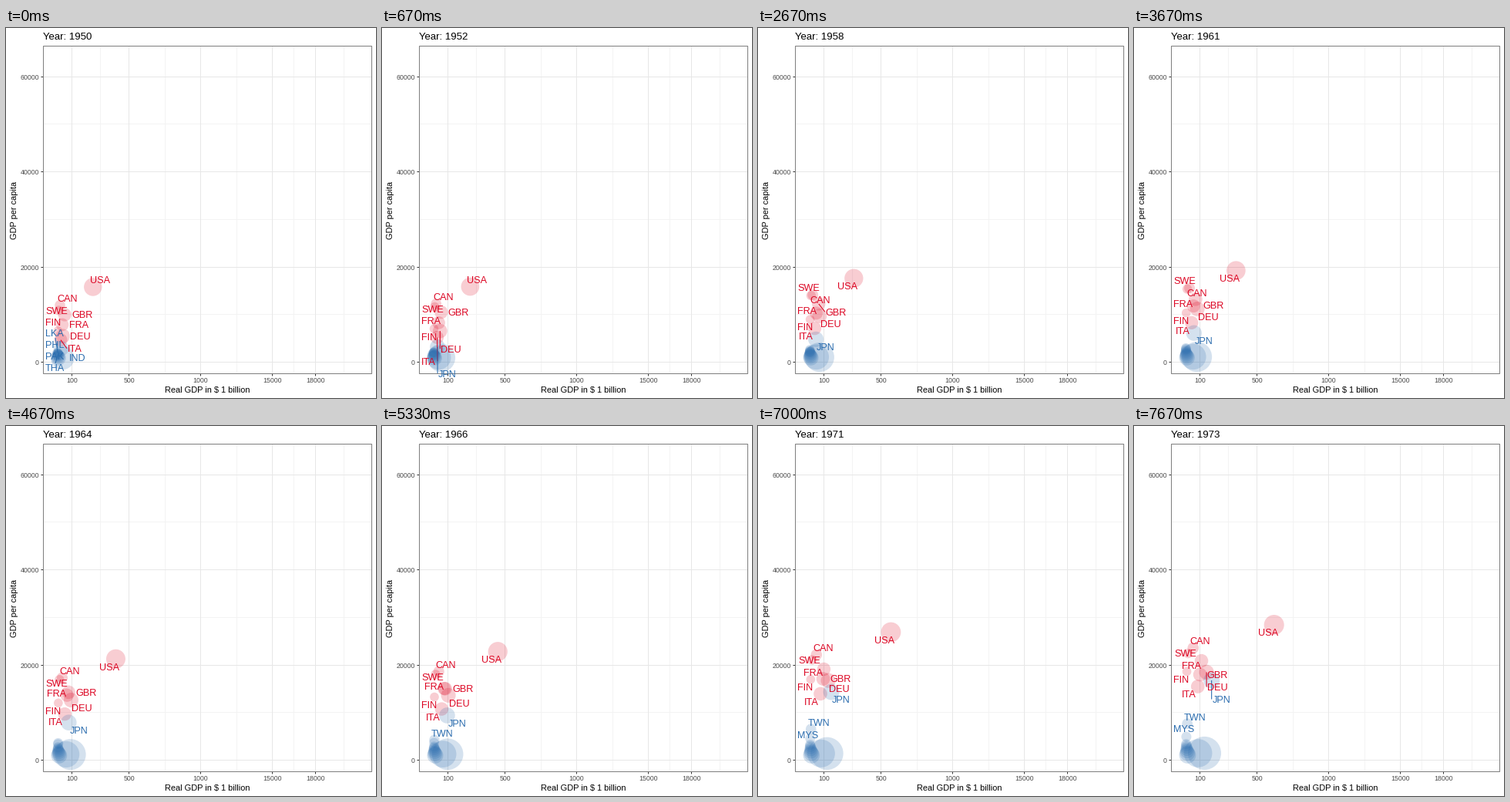
A matplotlib script for the animation above (8000 ms loop, 480x480 px).

```python
import matplotlib.pyplot as plt
import numpy as np
from matplotlib.animation import FuncAnimation
from matplotlib.patches import Circle, Rectangle

plt.rcParams["font.family"] = "Liberation Sans"

FIRST, LAST = 1950, 1973
LOOP, STEP = 8000, 50  # ms
RED, BLUE = "#DC0522", "#2A6CAE"
PT = 72 / 80  # points per pixel at 80 dpi
LEFT, RIGHT, TOP, BOTTOM = 48.5, 474.5, 23.5, 448.5

# Label offset from the bubble: left edge and middle height
SIDES = {"above": (-4, -9), "below": (1, 10), "right": (9, 0),
         "left": (-26, -3), "left up": (-18, -11), "left down": (-21, 10)}

# code: millions of people, thousands per head (first and last year),
# early deviation from steady growth, label side
RICH = {
    "CAN": ((14, 22.5), (12.0, 23.6), -0.07, "above"),
    "DEU": ((68, 79), (5.5, 18.5), 0.15, "below"),
    "FIN": ((4, 4.7), (6.6, 18.65), -0.05, "left down"),
    "FRA": ((42, 53), (7.9, 20.9), -0.07, "left"),
    "GBR": ((50, 56), (10.0, 18.0), 0, "right"),
    "ITA": ((47, 55), (4.7, 15.5), 0, "left down"),
    "SWE": ((7, 8.1), (10.9, 22.45), 0, "left up"),
    "USA": ((156, 217), (15.82, 28.44), -0.095, "left down"),
}
ASIA = {
    "CHN": ((546, 882), (0.9, 1.5), 0, "right"),
    "IND": ((359, 580), (0.95, 1.5), 0, "right"),
    "JPN": ((84, 108), (2.9, 16.8), -0.1, "below"),
    "MYS": ((6, 11), (1.9, 4.95), 0, "left up"),
    "TWN": ((8, 15.6), (1.3, 7.7), -0.1, "above"),
}
# The smaller Asian economies: the more people, the lower the income
SMALL = ("LKA", "KOR", "THA", "PHL", "PAK", "BGD", "IDN")
for code, people, start, end in zip(SMALL, np.geomspace(8, 77, 7),
                                    np.linspace(2.0, 0.9, 7),
                                    np.linspace(3.4, 1.1, 7)):
    ASIA[code] = ((people, people * 1.6), (start, end), 0, "left")
COUNTRIES = RICH | ASIA

CROWDED_UNTIL = 1951
CROWDED_SIDES = {"FRA": "right", "DEU": "right", "ITA": "right",
                 "FIN": "left up"}
LEFT_STACK = ("LKA", "PHL", "PAK", "THA")
LABELLED_FROM = {"JPN": 1952, "TWN": 1966, "MYS": 1971}


def x_px(gdp):
    return 66.9 + 0.186 * gdp


def y_px(per_capita):
    return 433.7 - 6.177 * per_capita


def grow(ends, t):
    return ends[0] * (ends[1] / ends[0]) ** t


def bubble(code, year):
    """Centre and radius of a country's circle."""
    population, income, bend, _ = COUNTRIES[code]
    t = (year - FIRST) / (LAST - FIRST)
    people = grow(population, t)
    per_capita = grow(income, t) * np.exp(bend * 6.75 * t * (1 - t) ** 2)
    return (x_px(people * per_capita / 10), y_px(per_capita),
            4.6 + 0.57 * np.sqrt(people))


def color_of(code):
    return RED if code in RICH else BLUE


def wanted_labels(year):
    """Yield middle height, left edge and code before spacing out."""
    crowded = year <= CROWDED_UNTIL
    codes = [*RICH, *(c for c, y in LABELLED_FROM.items() if year >= y)]
    if crowded:
        codes.append("IND")
        for i, code in enumerate(LEFT_STACK):
            yield 396 + 15 * i, 51, code
    for code in codes:
        side = COUNTRIES[code][-1]
        if crowded:
            side = CROWDED_SIDES.get(code, side)
        if code == "USA" and year < 1955:
            side = "above"
        x, y, _ = bubble(code, year)
        dx, dy = SIDES[side]
        yield y + dy, max(51, x + dx), code


def place_labels(year):
    """Work from the top, moving a label down while it covers another."""
    placed = []
    for mid, left, code in sorted(wanted_labels(year)):
        for other_mid, other_left, _ in placed:
            if abs(left - other_left) < 27 and abs(mid - other_mid) < 11:
                mid = other_mid + 16
        placed.append((mid, left, code))
    return placed


fig = plt.figure(figsize=(6, 6), dpi=80, facecolor="white")
ax = fig.add_axes([0, 0, 1, 1])
ax.set(xlim=(0, 480), ylim=(480, 0))
ax.axis("off")


def line(xs, ys, color, width=1.0, z=1):
    return ax.plot(xs, ys, color=color, lw=width * PT, zorder=z, snap=False,
                   solid_capstyle="butt")[0]


def text(x, y, s, size, color="black", **kw):
    kw = dict(ha="left", va="baseline", zorder=6) | kw
    return ax.text(x, y, s, fontsize=size * PT, color=color, **kw)


def pixel(v):
    return np.floor(v) + 0.5


def draw_panel():
    majors = np.array([100, 500, 1000, 1500, 1800, 2200])
    for gdp in (majors[:-1] + majors[1:]) / 2:
        line([pixel(x_px(gdp))] * 2, [TOP, BOTTOM], "#F3F3F3")
    for income in (10, 30, 50):
        line([LEFT, RIGHT], [pixel(y_px(income))] * 2, "#F3F3F3")
    names = ("100", "500", "1000", "15000", "18000")
    for gdp, name in zip(majors, names):
        x = pixel(x_px(gdp))
        line([x, x], [TOP, BOTTOM], "#E7E7E7", z=2)
        line([x, x], [BOTTOM, BOTTOM + 3], "#333333", z=4)
        text(x, 460.3, name, 8.8, "#4D4D4D", ha="center")
    for income in (0, 20, 40, 60):
        y = pixel(y_px(income))
        line([LEFT, RIGHT], [y, y], "#E7E7E7", z=2)
        line([LEFT - 3, LEFT], [y, y], "#333333", z=4)
        text(42.8, y + 3.2, str(income * 1000), 8.8, "#4D4D4D", ha="right")
    ax.add_patch(Rectangle((LEFT, TOP), RIGHT - LEFT, BOTTOM - TOP, fill=False,
                           ec="#7F7F7F", lw=PT, zorder=5, snap=False))
    text(261, 473, "Real GDP in $ 1 billion", 11, ha="center")
    text(16.5, 236, "GDP per capita", 11, rotation=90, ha="right", va="center")


def leader(code, left, mid, year):
    """Join a far bubble to the middle of the facing side of its label."""
    x, y, _ = bubble(code, year)
    right = left + (20 if "I" in code else 26)
    gap = np.hypot(max(left - x, x - right, 0), max(abs(y - mid) - 6, 0))
    if gap < 9.2:
        return []
    if x < left:
        start = left - 1, mid
    elif x > right:
        start = right + 1, mid
    else:
        start = (left + right) / 2, mid + np.copysign(6, y - mid)
    return [line([start[0], x], [start[1], y], color_of(code), 1.07, z=4)]


draw_panel()
title = text(47.5, 15, "", 13.2)
moving = []


def draw(frame):
    while moving:
        moving.pop().remove()
    # each year starts on the step nearest to its share of the loop
    years = LAST - FIRST + 1
    year = FIRST + int((frame + 0.67) * STEP * years / LOOP)
    title.set_text(f"Year: {year}")
    for code in sorted(COUNTRIES):
        if code == "CHN" and year <= CROWDED_UNTIL:
            continue
        x, y, r = bubble(code, year)
        moving.append(ax.add_patch(Circle((x, y), r, fc=color_of(code),
                                          alpha=0.2, lw=0, zorder=3)))
    for mid, left, code in place_labels(year):
        moving.extend(leader(code, left, mid, year))
        moving.append(text(left, mid + 4.4, code, 12.6, color_of(code)))
    return [title, *moving]


anim = FuncAnimation(fig, draw, frames=LOOP // STEP, init_func=lambda: draw(0),
                     interval=STEP, repeat=True, repeat_delay=0, blit=False)
plt.show()
```
